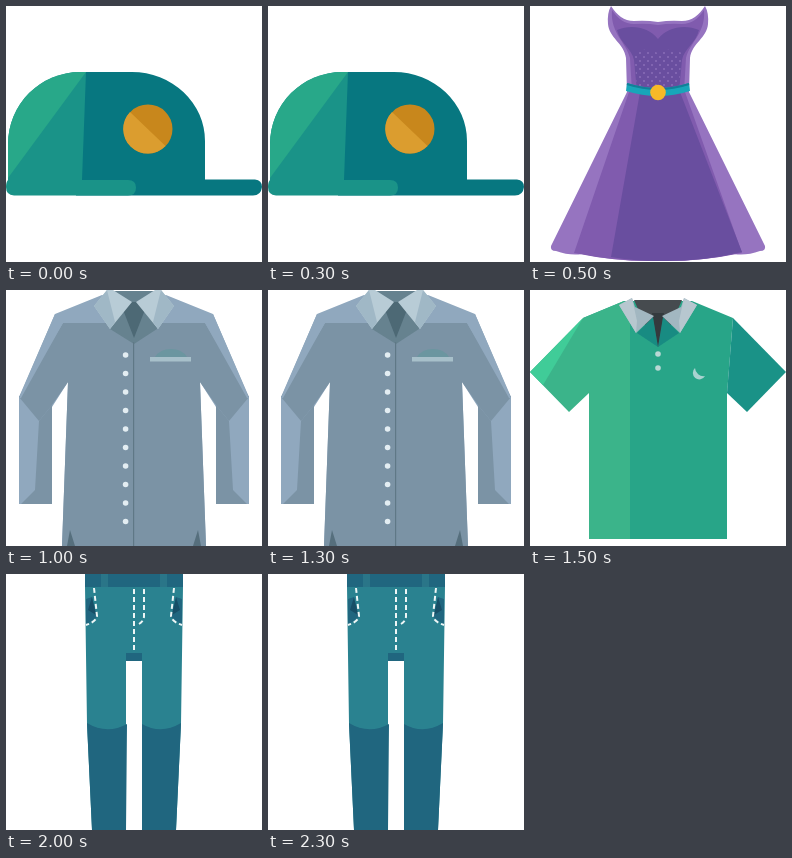
An HTML page that plays this animation: 256 by 256 pixels, repeating every 2.5 s.

```html
<!DOCTYPE html>
<html lang="en">
<head>
<meta charset="utf-8">
<title>Wardrobe</title>
<style>
  html, body { margin: 0; width: 100%; height: 100%; overflow: hidden; background: #fff; }
  svg { display: block; width: 100vw; height: 100vh; }
  .item { opacity: 0; }
  .stitch { fill: none; stroke: #eef6f6; stroke-width: 2; stroke-dasharray: 5 3; }
</style>
</head>
<body>
<svg viewBox="0 0 256 256">
  <defs>
    <pattern id="dots" x="104" y="41" width="8" height="8" patternUnits="userSpaceOnUse">
      <circle cx="2" cy="2" r="1" fill="#8a6cb7"/>
      <circle cx="6" cy="6" r="1" fill="#8a6cb7"/>
    </pattern>
  </defs>

  <g class="item" id="cap">
    <path fill="#077780" d="M78 66H126A73 69 0 0 1 199 135V173.500H249Q256 174 256 181Q255 189.500 247 189.500H70V174Z"/>
    <path fill="#1a9388" d="M80 66L76 174H122Q130 174 130 181.500Q130 189.500 122 189.500H8Q0 189 0 181Q0 176 2 174V138A72 72 0 0 1 74 66Z"/>
    <path fill="#28a889" d="M80 66L2 172V138A72 72 0 0 1 74 66Z"/>
    <circle cx="142" cy="123" r="24.500" fill="#c8871c"/>
    <path fill="#db9d2f" d="M124 106A24.500 24.500 0 1 0 159.500 140Z"/>
  </g>

  <g class="item" id="dress">
    <path fill="#9674c0" d="M97 86L21 240Q20 245 26 245Q40 250 52 248Q88 256 128 255Q168 256 204 248Q216 250 230 245Q236 245 235 240L159 86Z"/>
    <path fill="#805bae" d="M99 86L44 247Q88 256 128 255Q168 256 212 247L155 86Z"/>
    <path fill="#694e9f" d="M110 86L81 251Q104 255 128 255Q170 256 212 246L150 86Z"/>
    <path fill="#9674c0" d="M81 0C87 9 94 15 104 15Q116 14 128 16Q140 14 152 15C162 15 169 9 175 0Q179 7 178 18C177 32 162 37 160 52L159 86H97L96 52C94 37 79 32 78 18Q77 7 81 0Z"/>
    <path fill="#805bae" d="M82 4C88 13 95 18 104 18Q116 17 128 19Q140 17 152 18C161 18 168 13 174 4C176 27 160 36 156 52L154 86H102L100 52C96 36 80 27 82 4Z"/>
    <path fill="#694e9f" d="M87 24C101 18 119 21 128 33C137 21 155 18 169 24C166 37 154 43 152 54L149 86H107L104 54C102 43 90 37 87 24Z"/>
    <path fill="url(#dots)" d="M104 47Q116 40 128 47Q140 40 152 47L149 80H107Z"/>
    <path fill="#18a6b9" d="M97 77Q128 87 159 77L160 85Q128 95 96 85Z"/>
    <path fill="none" stroke="#127f98" stroke-width="2" d="M97 78Q128 88 159 78"/>
    <circle cx="128" cy="86.500" r="7.800" fill="#f7b928"/>
  </g>

  <g class="item" id="shirt">
    <path fill="#90a8be" d="M96 5L49 24L13 107V214H46V117L62 92L56 256H200L194 92L210 117V214H243V107L207 24L160 5Z"/>
    <path fill="#7b93a5" d="M57 33H199L243 107L223 131L210 115L194 92L200 256H56L62 92L46 115L33 131L13 107Z"/>
    <path fill="#90a8be" d="M49 24H57V33L15 108H13ZM207 24H199V33L241 108H243Z"/>
    <path fill="#7b93a5" d="M46 115L33 131L29 200L15 214H46ZM210 115L223 131L227 200L241 214H210Z"/>
    <path fill="#66828f" d="M106 1H150L151 39L128 54L104 39Z"/>
    <path fill="#4d6975" d="M114 12H142L128 48Z"/>
    <path fill="#b8ccd6" d="M101 0H107L126 12L104 39L88 16ZM155 0H149L130 12L152 39L168 16Z"/>
    <path fill="#a0b8c6" d="M101 0L88 16L104 39L109 32ZM155 0L168 16L152 39L147 32Z"/>
    <path fill="none" stroke="#5f7886" stroke-width="1.200" d="M127.600 52V256"/>
    <path fill="#566f7d" d="M64 240L69 256H61ZM192 240L187 256H195Z"/>
    <path fill="#6b96a0" d="M149 67Q154 59 165 59Q176 59 181 67Z"/>
    <rect x="144" y="67" width="41" height="4.500" fill="#a7c0ca"/>
    <g id="buttons" fill="#e3edf2"></g>
  </g>

  <g class="item" id="polo">
    <path fill="#28a588" d="M94 11L53 28L59 104V249H197V104L203 28L162 11Z"/>
    <path fill="#3bb48a" d="M94 11L53 28L0 82L39 122L59 103V249H100V16Z"/>
    <path fill="#40cc98" d="M53 28L0 82L13 95Z"/>
    <path fill="#1a9287" d="M203 28L256 82L217 122L197 103Z"/>
    <path fill="#464b4f" d="M104 10H152L142 33L128 57L114 33Z"/>
    <path fill="#343a3e" d="M122 23H134L128 57Z"/>
    <path fill="#188b82" d="M123 27L128 57L107 43ZM133 27L128 57L149 43Z"/>
    <path fill="#a2b7c1" d="M102 8L89 15L106 43L124 26L105 17ZM154 8L167 15L150 43L132 26L151 17Z"/>
    <path fill="#b7c7cf" d="M102 8L89 15L106 43L107 31ZM154 8L167 15L150 43L149 31Z"/>
    <circle cx="128" cy="64" r="2.800" fill="#b9d8d5"/>
    <circle cx="128" cy="78" r="2.800" fill="#b9d8d5"/>
    <path fill="#a9d3d0" d="M165 78A6.500 6.500 0 1 0 175 86A8.500 8.500 0 0 1 165 78Z"/>
  </g>

  <g class="item" id="trousers">
    <path fill="#2a8290" d="M79 12H177L175 150L170 256H136V86H120V256H86L81 150Z"/>
    <path fill="#20667f" d="M81 149Q101 161 121 150L120 256H86ZM175 149Q155 161 136 150V256H170Z"/>
    <path fill="#20667f" d="M79 0H177V13H79ZM120 79H136V87H120Z"/>
    <path fill="#20667f" d="M80 25L86 23L91 43L80 51ZM176 25L170 23L165 43L176 51Z"/>
    <path fill="#174f67" d="M82 36L86 23L90 41ZM174 36L170 23L166 41Z"/>
    <path fill="#2a7588" d="M95 0H102V13H95ZM154 0H161V13H154Z"/>
    <path class="stitch" d="M88 14L91 42Q90 48 80 51"/>
    <path class="stitch" d="M168 14L165 42Q166 48 176 51"/>
    <path class="stitch" d="M128 15V78"/>
    <path class="stitch" d="M138 15V42Q138 48 131 51"/>
  </g>
</svg>
<script>
  const HOLD = 500;
  const items = [...document.querySelectorAll('.item')];
  const loop = HOLD * items.length;
  const share = 1 / items.length;

  const buttons = document.getElementById('buttons');
  for (let i = 0; i < 10; i++) {
    const dot = document.createElementNS(buttons.namespaceURI, 'circle');
    dot.setAttribute('cx', 119.6);
    dot.setAttribute('cy', 65 + i * 18.5);
    dot.setAttribute('r', 2.8);
    buttons.append(dot);
  }

  // Each garment holds for its share of the loop, then cuts to the next.
  items.forEach((item, i) => {
    item.animate([
      { opacity: 1, offset: 0 },
      { opacity: 1, offset: share },
      { opacity: 0, offset: share },
      { opacity: 0, offset: 1 }
    ], { duration: loop, delay: i * HOLD - loop, iterations: Infinity }).startTime = 0;
  });
</script>
</body>
</html>
```
